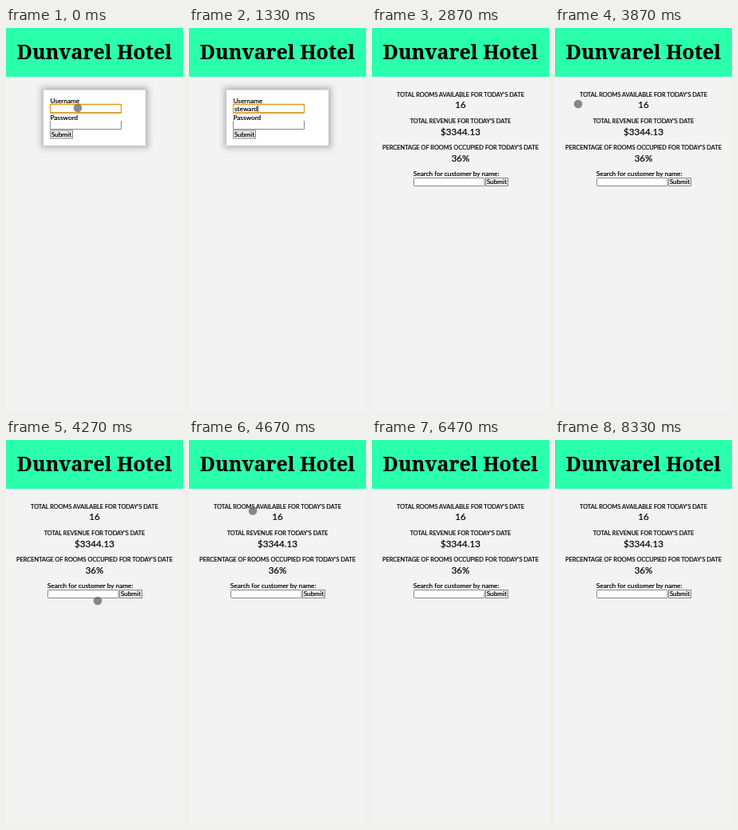
An HTML page for the animation above (8.54 s loop, 222 px wide and 480 px high).

```html
<!DOCTYPE html>
<html lang="en">
<head>
<meta charset="utf-8">
<title>Hotel login</title>
<style>
  html, body { margin: 0; width: 100%; height: 100%; overflow: hidden; background: #f3f3f3; }
  svg { display: block; width: 100%; height: 100%; }
  text { font: 8.3px Lato, sans-serif; fill: #000; stroke: #000; stroke-width: .2; }
  .title { font: bold 25px "Noto Serif", serif; }
  .stat { font-size: 7.4px; }
  .value { font-size: 11.6px; }
  .mid { text-anchor: middle; }
  .field { fill: #fff; stroke: #888; }
  .button { fill: #efefef; stroke: #888; }
  .shadow { fill: #b4b4b4; filter: blur(3.5px); }
  #ring { fill: none; stroke: #e59a1c; stroke-width: 1.3; }
  #cursor { fill: #5a5a5a; fill-opacity: .7; }
</style>
</head>
<body>
<svg viewBox="0 0 222 480">
  <rect width="222" height="480" fill="#f3f3f3"/>
  <rect width="222" height="61" fill="#2affac"/>
  <text class="title mid" x="111" y="39">Dunvarel Hotel</text>

  <g id="login">
    <rect class="shadow" x="44" y="74" width="134.5" height="76"/>
    <rect x="47" y="77.5" width="128" height="69.5" fill="#fff"/>
    <text x="55.4" y="93.5">Username</text>
    <rect class="field" x="55.5" y="95.5" width="89" height="10.5"/>
    <text x="55.4" y="114.5">Password</text>
    <path class="field" d="M55.5 116V126.5H144.5V116"/>
    <rect class="button" x="55.5" y="128" width="28" height="10"/>
    <text class="mid" x="69.4" y="136">Submit</text>
    <text id="user" x="57" y="103.8"></text>
    <text id="pass" x="57" y="124.8"></text>
    <rect id="caret" width=".7" height="8"/>
    <rect id="ring" rx="1.2"/>
  </g>

  <g id="dashboard">
    <g id="stats"></g>
    <text x="51.8" y="185.3">Search for customer by name:</text>
    <rect class="field" x="52.5" y="187.5" width="88.5" height="10" rx=".8"/>
    <rect class="button" x="142.5" y="187.5" width="28" height="10"/>
    <text class="mid" x="156.4" y="195">Submit</text>
  </g>

  <circle id="cursor" r="5.3"/>
</svg>
<script>
const LOOP = 8540, TICK = 1000 / 15;
const USER = 'steward', DOTS = 12, DOTS_PER_KEY = 3;
const PASS_FOCUS = 1400, BUTTON_FOCUS = 2330, SIGNED_IN = 2670;
const STATS = [
  ['TOTAL ROOMS AVAILABLE', '16'],
  ['TOTAL REVENUE', '$3344.13'],
  ['PERCENTAGE OF ROOMS OCCUPIED', '36%']
];

// Pointer movements, in ticks: evenly timed points, hidden after the last one.
const sweeps = [
  { start: 0, step: 7, points: [[90, 100], [91, 102]] },
  { start: 52, step: 3, points: [[87, 98], [74, 89], [29, 95], [40, 170], [115, 201],
    [150, 120], [80, 88.5], [30, 165], [120, 206], [225, 140]] },
  { start: 95, step: 2, points: [[134, 300], [100, 270]] }
];

const el = id => document.getElementById(id);
const set = (node, attrs) => Object.entries(attrs).forEach(([k, v]) => node.setAttribute(k, v));
const show = (id, on) => set(el(id), { visibility: on ? 'visible' : 'hidden' });
const clamp = (v, max) => Math.max(0, Math.min(max, v));
const keysPressed = (t, first, gap, max) => clamp(Math.floor((t - first) / gap) + 1, max);

el('stats').innerHTML = STATS.map(([label, value], i) => `
  <text class="stat mid" x="111" y="${86.2 + 33.1 * i}">${label} FOR TODAY’S DATE</text>
  <text class="value mid" x="111" y="${100.2 + 33.3 * i}">${value}</text>`).join('');

// Catmull-Rom curve through four neighbouring values.
const curve = (a, b, c, d, k) =>
  b + k / 2 * (c - a + k * (2 * a - 5 * b + 4 * c - d + k * (3 * (b - c) + d - a)));

function pointerAt(t) {
  const tick = Math.floor((t + 4) / TICK);
  for (const { start, step, points } of sweeps) {
    const along = (tick - start) / step, i = Math.floor(along), last = points.length - 1;
    if (along < 0 || along >= last) continue;
    const near = [-1, 0, 1, 2].map(n => points[clamp(i + n, last)]);
    const [cx, cy] = [0, 1].map(axis => curve(...near.map(p => p[axis]), along - i));
    return { cx, cy };
  }
  return null;
}

function drawLogin(t) {
  const typed = keysPressed(t, 470, 100, USER.length);
  const dots = DOTS_PER_KEY * keysPressed(t, 1870, TICK, DOTS / DOTS_PER_KEY);
  el('user').textContent = USER.slice(0, typed);
  el('pass').textContent = '•'.repeat(dots);

  const onPass = t >= PASS_FOCUS, onButton = t >= BUTTON_FOCUS;
  set(el('ring'), onButton ? { x: 55.5, y: 128, width: 28, height: 10 }
    : { x: 55.5, y: onPass ? 116.3 : 95.5, width: 89, height: 10.5 });
  set(el('caret'), {
    x: 57.3 + el(onPass ? 'pass' : 'user').getComputedTextLength(),
    y: onPass ? 117.5 : 96.8,
    opacity: (onPass ? dots : typed) && !onButton ? 1 : 0
  });
}

function frame(now) {
  const t = now % LOOP, signedIn = t >= SIGNED_IN;
  show('login', !signedIn);
  show('dashboard', signedIn);
  if (!signedIn) drawLogin(t);
  const pointer = pointerAt(t);
  show('cursor', pointer);
  if (pointer) set(el('cursor'), pointer);
}

const start = performance.now();
function loop() {
  frame(performance.now() - start);
  requestAnimationFrame(loop);
}
loop();
</script>
</body>
</html>
```
